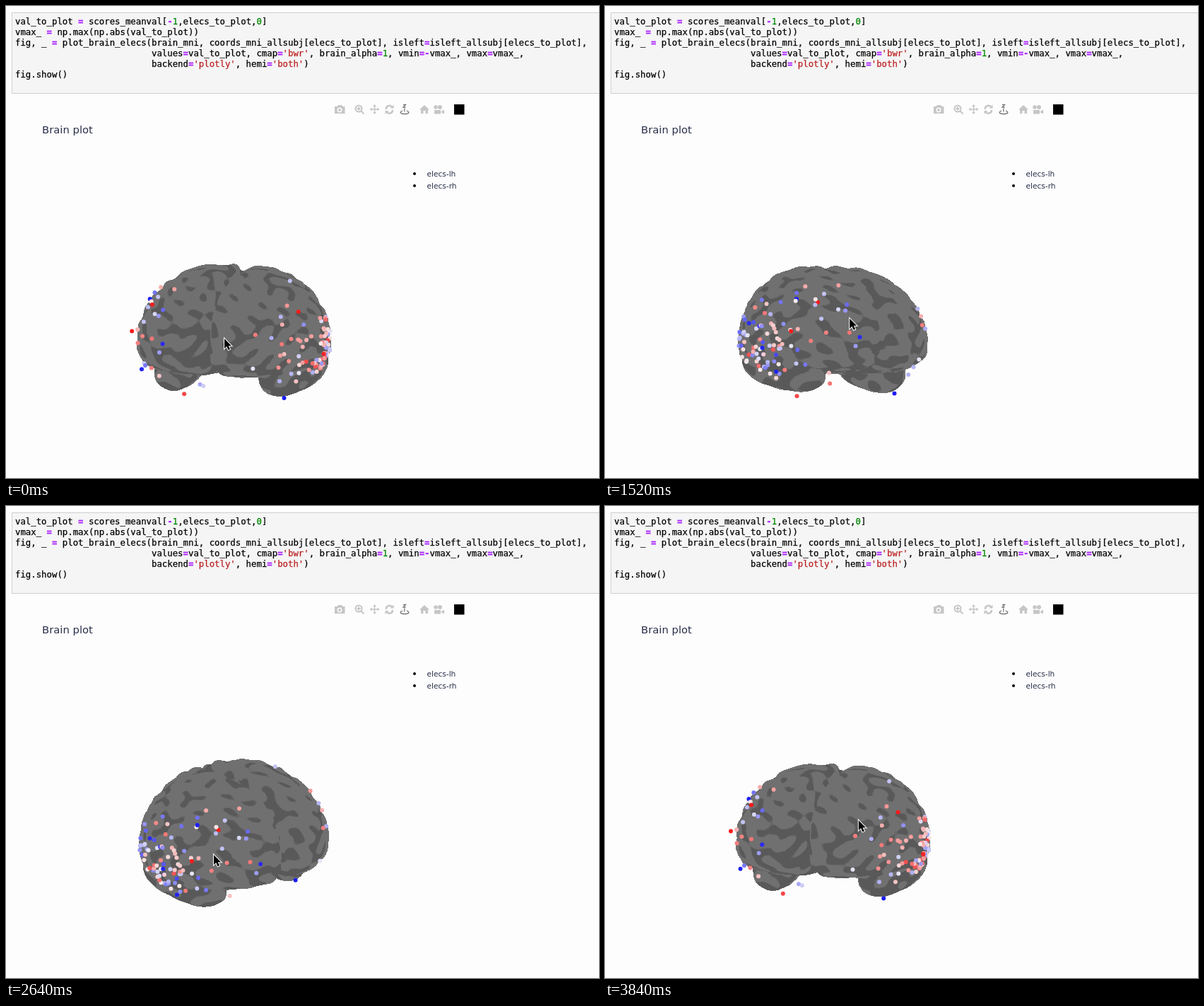
An HTML page with a canvas that plays this animation: 839 by 667 pixels, repeating every 3.92 s.

```html
<!DOCTYPE html>
<html>
<head>
<meta charset="utf-8">
<title>Brain plot</title>
<style>
  html, body { margin: 0; width: 100%; height: 100%; overflow: hidden; background: #fdfdfd; }
  pre, svg, canvas { position: absolute; left: 0; top: 0; margin: 0; }
  pre {
    box-sizing: border-box; left: 8px; top: 9px; right: 0; height: 115px; padding: 5px 0 0 4px; overflow: hidden;
    background: #f5f5f5; border: 1px solid #cfcfcf; border-right: 0; color: #000;
    font: 12.33px/15px "DejaVu Sans Mono", monospace; -webkit-text-stroke: .25px;
  }
  pre b { color: #a2f; }
  pre i { color: #080; font-style: normal; }
  pre u { color: #ba2121; text-decoration: none; }
  svg { font-family: "DejaVu Sans", sans-serif; fill: #2a2f4a; }
</style>
</head>
<body>
<pre>val_to_plot <b>=</b> scores_meanval[<b>-</b><i>1</i>,elecs_to_plot,<i>0</i>]
vmax_ <b>=</b> np.max(np.abs(val_to_plot))
fig, _ <b>=</b> plot_brain_elecs(brain_mni, coords_mni_allsubj[elecs_to_plot], isleft<b>=</b>isleft_allsubj[elecs_to_plot],
                          values<b>=</b>val_to_plot, cmap<b>=</b><u>'bwr'</u>, brain_alpha<b>=</b><i>1</i>, vmin<b>=-</b>vmax_, vmax<b>=</b>vmax_,
                          backend<b>=</b><u>'plotly'</u>, hemi<b>=</b><u>'both'</u>)
fig.show()</pre>

<svg width="839" height="667">
  <text x="51" y="179.500" font-size="14.8">Brain plot</text>
  <g font-size="10.6"><text x="595.500" y="241">elecs-lh</text><text x="595.500" y="258">elecs-rh</text></g>
  <g fill="#000"><circle cx="578" cy="237" r="2"/><circle cx="578" cy="254" r="2"/></g>
  <g fill="#c6c6c6" stroke="#c6c6c6" stroke-width="0">
    <path d="M465 142h3.500l1.500-2h5l1.500 2h3v10h-14.500z"/>
    <g fill="none" stroke-width="2">
      <circle cx="472" cy="147" r="2.700" stroke="#fdfdfd" stroke-width="1.500"/>
      <circle cx="499" cy="145" r="4.500"/><path d="M502.500 148.500l4 4M496.500 145h5M499 142.500v5"/>
      <path d="M516 146h11M521.500 140.500v11" stroke-width="1.500"/>
      <path d="M538 146a4.500 4.500 0 0 1 8-3.500M547 147a4.500 4.500 0 0 1-8 3" stroke-width="2.500"/>
    </g>
    <path d="M514.500 146l3-2.500v5zM528.500 146l-3-2.500v5zM521.500 139l-2.500 3h5zM521.500 153l-2.500-3h5z"/>
    <path d="M548.500 139.500v5h-5zM536.500 153v-5h5z"/>
    <path d="M562 139.500h3.500l-3.500 3.500h3.500M563.800 144.500v5M561 148c-5 2-3 4.500 3 4.500s8-2.500 3-4.500"
      fill="none" stroke="#777" stroke-width="1.300"/>
    <path d="M585 146.500l7-6.500 7 6.500h-2v5.500h-3.500v-4h-3v4H587v-5.500z"/>
    <path d="M606 147h9v5.500h-9zM616 149l4-2.500v6l-4-2z"/>
    <circle cx="608" cy="143" r="2.700"/><circle cx="614" cy="143" r="3"/>
  </g>
  <rect x="634" y="139" width="14.500" height="14.500" fill="#000"/>
</svg>
<canvas id="stage" width="839" height="667"></canvas>

<script>
const ctx = document.getElementById('stage').getContext('2d');
const { sin, cos, abs, max, min, PI, sqrt } = Math;
const LOOP = 3920, STEP = 80;
const CX = 322, CY = 465;                       // rotation centre on the stage
const BOX = { x: 150, y: 340, w: 340, h: 250 }; // area the mesh is drawn in

// turning points of the drag: time, yaw in degrees, sine of pitch, pointer x, pointer y
const KEYS = [
  [0, -25.5, .11, 309, 470],
  [320, -8, .16, 366, 477],
  [880, 40, -.01, 483, 447],
  [1440, 42, -.01, 335, 442],
  [1920, 67, -.02, 402, 440],
  [2640, 46, .31, 294, 493],
  [3040, -19, .1, 154, 455],
  [3360, -21.5, .07, 358, 434],
  [LOOP, -25.5, .13, 359, 446]
];

function poseAt(t) {
  const i = KEYS.findIndex(key => key[0] > t), a = KEYS[i - 1], b = KEYS[i];
  const f = (t - a[0]) / (b[0] - a[0]);
  const [, yaw, pitch, px, py] = a.map((v, k) => v + (b[k] - v) * f);
  return { yaw: yaw * PI / 180, pitch, px, py };
}

// ---- brain surface: a dense cloud of shaded points, y pointing down ----
const points = [];
const superRadius = (c, s, q) => (abs(c) ** q + abs(s) ** q) ** (-1 / q);

function fold(x, y, z) {
  const a = x / 7 + 1.2 * sin(z / 23) + sin(y / 17);
  const b = y / 4.8 + 1.3 * sin(x / 19 + 1) + sin(z / 27);
  const c = z / 7 + 1.2 * sin(y / 21 + 2) + sin(x / 25);
  return sin(a) * cos(b) + sin(b) * cos(c) + sin(c) * cos(a);
}

function addShell(nu, nv, side, [ox, oy, oz], shape) {
  for (let j = 0; j <= nv; j++) for (let i = 0; i < nu; i++) {
    const [x, y, z, tone] = shape(i / nu * 2 * PI, (j / nv - .5) * PI);
    const g = fold(side * (ox + x), oy + y, oz + z), grow = 1 + .012 * g;
    const light = min(1, max(0, .5 + 3 * (g + tone)));
    points.push(side * (ox + x * grow), oy + y * grow, oz + z * grow, Math.round(89 + 23 * light));
  }
}

function cerebrum(u, v) {
  const c = cos(u), s = sin(u), h = cos(v), t = sin(v), medial = max(0, -c);
  const k = superRadius(h, t, t > 0 ? 3 : 2 + medial);
  const r = k * h * (c < 0 ? superRadius(c, s, 3) : 1);
  const z = r * s * 113;
  const y = k * t * (t < 0 ? 105 - .1 * z : 43);
  return [r * c * (c < 0 ? 31 : 104), y, z, .4 - .6 * k * t - .8 * medial * h];
}

function temporalLobe(u, v) {
  const k = superRadius(cos(v), sin(v), 2.4), r = 33 * k * cos(v), t = k * sin(v);
  return [r * cos(u) - 8 * t, r * sin(u) + 12 * t, 64 * t, .05 - .6 * sin(u)];
}

for (const side of [-1, 1]) {
  addShell(560, 280, side, [33, 10, 0], cerebrum);
  addShell(240, 200, side, [88, 43, -12], temporalLobe);
}
const cloud = Float32Array.from(points);

// ---- electrodes: x, y, z and value from -1 (blue) to 1 (red) ----
const electrodes = [
  [-97, -45, 64, .95], [-114, -47, 37, 0], [-136, -4, 49, .9], [-77, -2, 107, .5],
  [94, 82, 31, -.95], [117, -42, 32, .95], [-76, 87, 3, .7], [-135, 53, 19, -.85]
];

let seed = 7;
const random = () => (seed = (seed * 16807) % 2147483647) / 2147483647;
const gauss = (mean, spread) => mean + spread * 2 * (random() + random() + random() - 1.5);

// most sit in a cluster low on each side, one in four is scattered further forward
for (const side of [-1, 1]) for (let i = 0; i < 110; i++) {
  const scattered = i % 4 == 0;
  const z = scattered ? gauss(40, 45) : gauss(-20, 40);
  const y = scattered ? gauss(-10, 40) : gauss(20, 28);
  const value = gauss(side * .1, .32);
  const room = 1 - (z / 113) ** 2 - ((y - 10) / (y < 10 ? 105 : 72)) ** 2;
  if (room > .03) electrodes.push([side * (35 + 104 * sqrt(room)), y, z, value]);
}

function bwr(value) {
  const rest = Math.round(235 * (1 - min(.88, abs(value))));
  return value < 0 ? `rgb(${rest},${rest},245)` : `rgb(245,${rest},${rest})`;
}

// ---- drawing ----
const image = ctx.createImageData(BOX.w, BOX.h);
const pixels = new Uint32Array(image.data.buffer);
const depths = new Float32Array(BOX.w * BOX.h);

function drawBrain({ yaw, pitch }) {
  const cw = cos(yaw), sw = sin(yaw), cp = sqrt(1 - pitch * pitch);
  pixels.fill(0);
  depths.fill(-1e9);
  for (let i = 0; i < cloud.length; i += 4) {
    const x = cloud[i], y = cloud[i + 1], z = cloud[i + 2];
    const near = z * cw - x * sw, depth = near * cp - y * pitch;
    const col = (CX - BOX.x + x * cw + z * sw) | 0;
    const row = (CY - BOX.y + y * cp + near * pitch) | 0;
    const at = row * BOX.w + col, color = 0xff000000 + cloud[i + 3] * 0x10101;
    for (const p of [at, at + 1, at + BOX.w, at + BOX.w + 1]) {
      if (depth > depths[p]) { depths[p] = depth; pixels[p] = color; }
    }
  }
  ctx.putImageData(image, BOX.x, BOX.y);

  electrodes.map(([x, y, z, value]) => {
    const near = z * cw - x * sw;
    return { x: CX + x * cw + z * sw, y: CY + y * cp + near * pitch, depth: near * cp - y * pitch, value };
  }).sort((a, b) => a.depth - b.depth).forEach(({ x, y, depth, value }) => {
    const surface = depths[((y - BOX.y) | 0) * BOX.w + ((x - BOX.x) | 0)];
    if (depth < surface - 14) return;
    ctx.fillStyle = bwr(value);
    ctx.beginPath();
    ctx.arc(x, y, 3, 0, 2 * PI);
    ctx.fill();
  });
}

function drawTooltip(x, y) {
  const bubble = new Path2D('M0 0H79V47H0V29L-5 24L0 19Z');
  ctx.save();
  ctx.translate(x, y);
  ctx.fillStyle = 'rgba(253,253,253,.8)';
  ctx.fillRect(79, 0, 43, 47);
  ctx.fillStyle = '#3c3c3c';
  ctx.strokeStyle = '#fff';
  ctx.lineWidth = 2;
  ctx.stroke(bubble);
  ctx.fill(bubble);
  ctx.font = '11.3px "Liberation Sans", sans-serif';
  ctx.fillText('hemi-lh', 81, 13);
  ctx.fillStyle = '#fff';
  ['x: −0.2514347', 'y: 0.2481932', 'z: 0.2748625'].forEach((line, i) => ctx.fillText(line, 3, 13 + i * 14.8));
  ctx.restore();
}

function drawPointer(x, y) {
  const arrow = new Path2D('M0 0V14L3.300 11L5.600 16.200L8 15.100L5.700 10.200H10Z');
  ctx.save();
  ctx.translate(x, y);
  ctx.lineWidth = 2;
  ctx.strokeStyle = '#fff';
  ctx.stroke(arrow);
  ctx.fillStyle = '#000';
  ctx.fill(arrow);
  ctx.restore();
}

let shown = -1;
function tick(now) {
  const t = Math.floor(now % LOOP / STEP) * STEP;
  if (t != shown) {
    shown = t;
    const pose = poseAt(t);
    ctx.clearRect(0, 0, 839, 667);
    drawBrain(pose);
    if (t >= 3360 && t < 3640) drawTooltip(pose.px - 5, pose.py - 18);
    drawPointer(pose.px, pose.py);
  }
  requestAnimationFrame(tick);
}
tick(performance.now());
</script>
</body>
</html>
```
